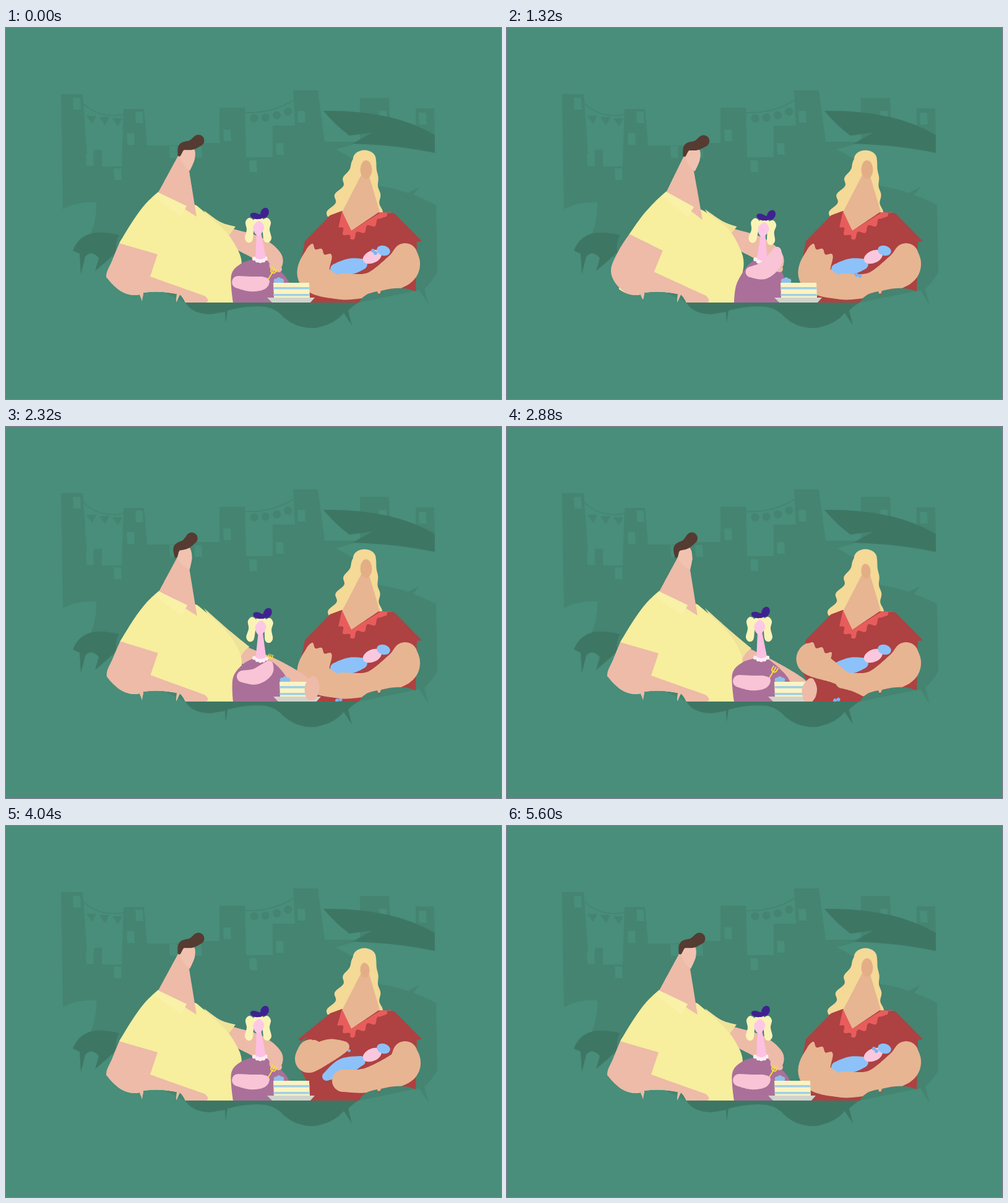
Recreate the animation shown at these times as an HTML page. Size 800 px wide and 600 px high, loop 5640 ms.

```html
<!DOCTYPE html>
<html lang="en">
<head>
<meta charset="utf-8">
<title>Family picnic</title>
<style>
  html, body { margin: 0; width: 100%; height: 100%; overflow: hidden; background: #488e7a; }
  svg { display: block; width: 800px; height: 600px; }
</style>
</head>
<body>
<svg viewBox="0 0 800 600">
  <defs>
    <clipPath id="edge">
      <path d="M0 0H800V426H662Q640 416 606 425L603 433L600 426Q585 428 576 436L570 444H290Q285 434 281 431L275 444L276 430Q245 424 222 428L220 442L216 431Q188 437 163 404H0Z"/>
    </clipPath>
  </defs>
  <g id="town" fill="#448471">
    <path d="M89 107H124L131 205H142V197H155V224H187L190 131H223L228 190H300V186H345V129H386L388 209H431V158H467L464 101H504L515 184H572V113H619L621 160H662V130H692L697 395Q690 408 676 422L683 448L668 424L570 444H290L200 400L137 333Q147 310 146 282Q115 280 92 293Z"/>
    <path d="M125 122Q150 147 190 140M386 137Q432 138 464 117" fill="none" stroke="#448471" stroke-width="1.5"/>
  </g>
  <path fill="#488e7a" d="M533 196Q555 190 565 187L620 190L694 202L698 288Q650 262 600 255Q585 222 533 196Z"/>
  <path fill="#448471" d="M638 273L668 257L654 275Z"/>
  <g fill="#3e7664">
    <path d="M513 134Q625 132 693 173V202Q640 190 560 187L592 169L555 174Q532 157 513 134Z"/>
    <path d="M108 360Q118 334 145 331Q165 330 183 335Q176 345 178 362L165 375L144 393L150 372Q138 358 128 370L121 398L119 365Z"/>
    <path d="M290 444Q300 462 330 463Q348 460 354 459L355 477L358 457Q390 448 420 451Q438 455 448 467Q470 487 500 485Q530 480 546 461L559 481L553 457Q562 448 570 444Z"/>
  </g>
  <g id="stage" clip-path="url(#edge)"></g>
</svg>
<script>
const LOOP = 5640, NS = 'http://www.w3.org/2000/svg';
const stage = document.getElementById('stage'), town = document.getElementById('town');
const movers = [];

function add(tag, attrs, parent = stage) {
  const el = document.createElementNS(NS, tag);
  for (const k in attrs) el.setAttribute(k, attrs[k]);
  return parent.appendChild(el);
}
const ellipse = (fill, cx, cy, rx, ry, turn = 0, parent = stage) =>
  add('ellipse', { fill, cx, cy, rx, ry, transform: `rotate(${turn} ${cx} ${cy})` }, parent);

// Moves are [from, to, pose]; each one eases from wherever the last ended
function poseAt(poses, moves, t) {
  let v = poses[0];
  for (const [from, to, i] of moves) {
    if (t <= from) break;
    const u = Math.min(1, (t - from) / (to - from)), e = u * u * (3 - 2 * u);
    v = v.map((x, n) => x + (poses[i][n] - x) * e);
  }
  return v;
}

function morph(fill, poses, moves, toPath, parent) {
  const el = add('path', { fill }, parent);
  movers.push(t => el.setAttribute('d', toPath(poseAt(poses, moves, t))));
}

// Closed curve; points are "x,y", a trailing "!" marks a corner
function shape(fill, poses, moves = [], parent) {
  const corner = poses[0].split(' ').map(s => s.endsWith('!'));
  const n = corner.length;
  morph(fill, poses.map(s => s.match(/\d+/g).map(Number)), moves, p => {
    const pt = i => { i = (i + n) % n; return [p[2 * i], p[2 * i + 1]]; };
    const tan = i => [0, 1].map(k => corner[(i + n) % n] ? 0 : (pt(i + 1)[k] - pt(i - 1)[k]) / 6);
    let d = 'M' + pt(0);
    for (let i = 0; i < n; i++) {
      const a = pt(i), b = pt(i + 1), s = tan(i), e = tan(i + 1);
      d += 'C' + [a[0] + s[0], a[1] + s[1], b[0] - e[0], b[1] - e[1], ...b];
    }
    return d + 'Z';
  }, parent);
}

// Soft limb: circles swept along a spline through [x, y, radius] joints
function limb(fill, poses, moves = [], parent) {
  morph(fill, poses, moves, p => {
    const last = p.length / 3 - 1;
    const joint = (i, k) => p[3 * Math.min(last, Math.max(0, i)) + k];
    let d = '';
    for (let s = 0; s <= last * 16; s++) {
      const i = Math.min(last - 1, s >> 4), u = s / 16 - i;
      const [x, y, r] = [0, 1, 2].map(k => {
        const a = joint(i - 1, k), b = joint(i, k), c = joint(i + 1, k), e = joint(i + 2, k);
        return b + u / 2 * (c - a + u * (2 * a - 5 * b + 4 * c - e + u * (3 * (b - c) + e - a)));
      });
      d += `M${x - r} ${y}a${r} ${r} 0 1 0 ${2 * r} 0a${r} ${r} 0 1 0 ${-2 * r} 0`;
    }
    return d;
  }, parent);
}

// Wavy line between two points
function frill(x0, y0, x1, y1, waves, amp) {
  const len = Math.hypot(x1 - x0, y1 - y0), steps = waves * 10;
  return Array.from({ length: steps + 1 }, (_, i) => {
    const u = i / steps, w = amp * Math.sin(u * waves * 2 * Math.PI) / len;
    return [x0 + (x1 - x0) * u - (y1 - y0) * w, y0 + (y1 - y0) * u + (x1 - x0) * w];
  }).join('L');
}

// Poses are [dx, dy, angle, scale] around a pivot
function group(px, py, poses, moves) {
  const g = add('g', {});
  movers.push(t => {
    const [x, y, r, s] = poseAt(poses, moves, t);
    g.setAttribute('transform', `translate(${x + px} ${y + py}) rotate(${r}) scale(${s}) translate(${-px} ${-py})`);
  });
  return g;
}

// Town details
for (let i = 0; i < 3; i++) {
  add('path', { d: `M${130 + 21 * i} ${142 + 2 * i}h16l-7 13z` }, town);
}
for (let i = 0; i < 4; i++) ellipse('#448471', 401 + 18.3 * i, 146 - i * i * 1.2, 6.5, 6.5, 0, town);
const windows = '108,113 209,135 195,170 129,204 174,227 264,191 304,191 351,164 393,214 436,186 471,134 603,134 667,137';
for (const at of windows.split(' ')) {
  add('path', { fill: '#488e7a', d: `M${at}h12l1 19h-12z` }, town);
}

const MAN = [[950, 1550, 1], [1900, 2400, 0]];
const NOD = [[950, 1550, 1], [1900, 2400, 2], [2950, 3550, 0]];
const GRAB = [[1900, 2400, 1], [2450, 2850, 2], [2950, 3550, 0]];
const GIRL = [[250, 750, 1], [950, 1500, 2], [1950, 2600, 0]];
const SWAY = [[1000, 1800, 1], [1900, 2600, 0], [4100, 4850, 1], [4950, 5500, 0]];
const BOW = [[2300, 2800, 1], [5000, 5500, 0]];
const ARM = [[2550, 2880, 1], [2880, 3350, 2], [3500, 4000, 3], [4150, 4700, 4], [4950, 5520, 0]];
const HOLD = [[2950, 3600, 1], [5000, 5500, 0]];
const DROP = [[1150, 1500, 1], [2500, 2880, 2], [3500, 4000, 3], [4150, 4700, 0]];
const PUSH = [[450, 780, 1], [950, 1350, 2], [2450, 2850, 0]];
const REST = [0, 0, 0, 1];

const SKIN = '#edbba8', TAN = '#e7b592', YELLOW = '#f7ee9e', RED = '#ae4141', PINK = '#fac8de';
const BLUE = '#8cc2f9', BLOND = '#fbf3b6';

// Mother
morph('#f4d997', [[0], [1]], SWAY, ([sway]) => {
  const right = [], left = [];
  for (let y = 212; y <= 306; y += 3) {
    const u = (y - 206) / 94, wave = 4 * Math.cos((y - 255) * Math.PI / 14);
    right.push([597 + 10 * u - 3 * u * sway - wave * .6 * u, y]);
    left.unshift([564 - 43 * u + 6 * u * sway + wave * Math.min(1, 2 * u), y]);
  }
  return `M${left[left.length - 1]}A18 14 0 0 1 ${right.join('L')}L${left.join('L')}Z`;
});
shape(RED, ['543,296! 524,303! 483,345! 474,390! 490,420! 488,444! 662,444! 664,346! 672,345! 625,299!']);
shape(TAN, ['574,238! 587,240! 604,297! 558,328! 543,298!']);
add('path', { fill: '#e85d5c', d: `M558 328L543 296L${frill(522, 304, 556, 341, 3, 4)}L${frill(556, 341, 624, 299, 4, 4)}L606 298Z` });
const face = group(581, 240, [REST, [-1, 2, -5, .8]], BOW);
ellipse('#e3ae86', 582, 229, 9.5, 15, 0, face);

// Baby
limb(BLUE, [
  [533, 390, 9, 555, 386, 13, 575, 382, 9],
  [518, 405, 7, 545, 390, 14, 573, 380, 8]
], HOLD);
limb(TAN, [
  [645, 368, 20, 637, 390, 28, 590, 413, 18, 543, 410, 13],
  [645, 368, 20, 639, 391, 27, 585, 411, 20, 545, 412, 18]
], HOLD);
add('path', { fill: RED, d: `M600 310L628 300L${frill(672, 345, 606, 349, 3, 2.5)}Z` });
ellipse(PINK, 592, 370, 16, 10, -25);
ellipse(BLUE, 610, 360, 11, 8, 15);
const dummy = group(595, 361, [REST, [-58, 80, -60, 1], [-63, 80, -60, 1], [-42, 0, 0, .8]], DROP);
for (const k of [0, 4]) ellipse('#7ab4f2', 593 + k, 360 + k, 3, 3, 0, dummy);
limb(TAN, [
  [505, 368, 22, 498, 401, 26, 540, 422, 17, 577, 431, 6],
  [503, 366, 22, 493, 378, 24, 535, 402, 14, 578, 430, 6],
  [499, 366, 22, 491, 378, 23, 520, 408, 13, 537, 434, 6],
  [493, 367, 22, 490, 378, 21, 522, 363, 18, 546, 357, 9],
  [493, 367, 21, 498, 372, 23, 545, 372, 19, 581, 380, 6]
], ARM);
morph(RED, [
  [483, 345, 527, 370], [482, 345, 527, 369], [478, 345, 524, 362], [472, 345, 530, 341], [471, 350, 555, 352]
], ARM, p => `M543 296L524 303L${frill(...p, 3, 3)}Z`);

// Father
limb(SKIN, [
  [362, 338, 14, 405, 355, 18, 430, 372, 16, 436, 383, 10],
  [388, 372, 14, 435, 392, 14, 480, 415, 12, 494, 428, 10],
  [388, 372, 14, 430, 392, 13, 470, 415, 12, 484, 428, 10]
], GRAB);
shape('#efe39a', ['320,295! 347,314 371,321! 359,337 345,350!', '320,292! 350,312 372,321! 361,334 352,350!',
  '320,293! 365,333 395,358! 386,366 376,382!'], NOD);
shape(YELLOW, [
  '246,265! 225,285 205,312 183,348! 180,430! 290,444! 368,444! 381,385 371,352 348,322 308,287!',
  '263,264! 245,280 225,300 205,326! 179,430! 290,444! 368,444! 383,385 376,352 357,321 321,299!'
], MAN);
shape(SKIN, [
  '183,348! 172,375 162,402 175,425 200,445! 290,445! 322,444 326,439 321,433! 233,402! 245,366!',
  '205,326! 185,352 171,385 178,410 205,433! 290,445! 322,444 326,439 322,433! 240,391! 255,357!'
], MAN);
shape(SKIN, ['278,207! 300,212! 296,231! 308,305! 246,266!', '290,207! 310,212! 305,232! 320,313! 263,265!'], MAN);
shape('#f9f1a8', ['246,266! 240,274! 283,305! 292,288!', '263,264! 256,273! 297,305! 307,290!'], MAN);
const dad = group(296, 231, [REST, [10, 1, 0, 1], [-1, 0, -13, 1]], NOD);
shape('#f1c2b0', ['281,206 290,194 304,196 305,212 297,231! 288,222'], [], dad);
limb('#553b32', [[280, 205, 2.5, 285, 192, 6, 300, 189, 8, 311, 182, 9.5]], [], dad);

// Girl
shape('#aa7099', [
  '402,374! 380,381 364,400 367,444! 462,444! 457,411 440,390 423,376!',
  '399,374! 384,386 370,415 367,444! 455,444! 438,420 430,392 422,376!',
  '405,372! 388,387 371,415 367,444! 445,444! 455,416 448,393 430,376!'
], GIRL);
const girl = group(411, 376, [REST, REST, [0, 3, 9, 1]], GIRL);
shape('#fdc0e2', ['405,330! 412,330! 421,376! 403,376!'], [], girl);
for (let i = -2; i <= 2; i++) ellipse('#fbeef2', 411 + 5 * i, 377 - i * i, 3.2, 3.2, 0, girl);
for (const flip of ['', 'translate(815 0) scale(-1 1)']) {
  const side = add('g', { transform: flip }, girl);
  shape(BLOND, ['401,313 393,307 387,314 389,326 386,340 391,347 398,344 400,330'], [], side);
}
ellipse(BLOND, 408.5, 315, 10, 9, 0, girl);
shape('#fdc8e6', ['400,320 409,312 417,320 415,329 408,336 401,330'], [], girl);
ellipse('#3f2290', 403, 304, 8.5, 5, 15, girl);
ellipse('#3f2290', 418, 299, 6.5, 8.5, 25, girl);
ellipse('#3f2290', 410, 305, 5, 4, 0, girl);

// Cake
const cake = group(461, 436, [REST, [12, 0, 2, 1], [10, 0, 0, 1]], PUSH);
add('path', { fill: '#d2d3ca', d: 'M422 436H499L491 445H431Z' }, cake);
for (let i = 0; i < 4; i++) {
  ellipse('#8ebfe9', 441 + 4.5 * Math.cos(i * Math.PI / 2), 409 + 2 * Math.sin(i * Math.PI / 2), 3.8, 3.8, 0, cake);
}
add('path', { fill: '#fbf4c2', d: 'M432 412H490L491 436H433Z' }, cake);
for (const y of [419, 430]) add('path', { fill: '#9fcfe8', d: `M432.5 ${y}h58v3.5h-58z` }, cake);

// Father's hand rests on the girl or pulls the cake
limb(SKIN, [
  [432, 372, 10, 437, 380, 10, 434, 385, 8, 441, 390, 5],
  [501, 412, 6, 499, 424, 12, 498, 435, 10, 496, 440, 6],
  [491, 412, 6, 489, 424, 12, 488, 435, 10, 486, 440, 6]
], GRAB);

const fork = group(424, 406, [[0, 0, 31, 1], [24, 4, 95, 0], [1, -57, -10, .45]], GIRL);
add('path', { fill: 'none', stroke: '#f5dc3c', 'stroke-width': 2, d: 'M424 408V394M420 385V390Q420 394 424 394Q428 394 428 390V385M424 394V385' }, fork);
limb('#f8c4d6', [
  [375, 411, 10, 395, 414, 12, 412, 413, 11, 420, 410, 6],
  [395, 402, 8, 415, 405, 13, 435, 408, 12, 446, 411, 7],
  [394, 392, 9, 415, 388, 14, 430, 366, 14, 433, 344, 7]
], GIRL);

const start = performance.now();
function draw(now) {
  const t = Math.floor(Math.max(0, now - start) % LOOP / 40) * 40;
  movers.forEach(move => move(t));
  requestAnimationFrame(draw);
}
draw(start);
</script>
</body>
</html>
```
